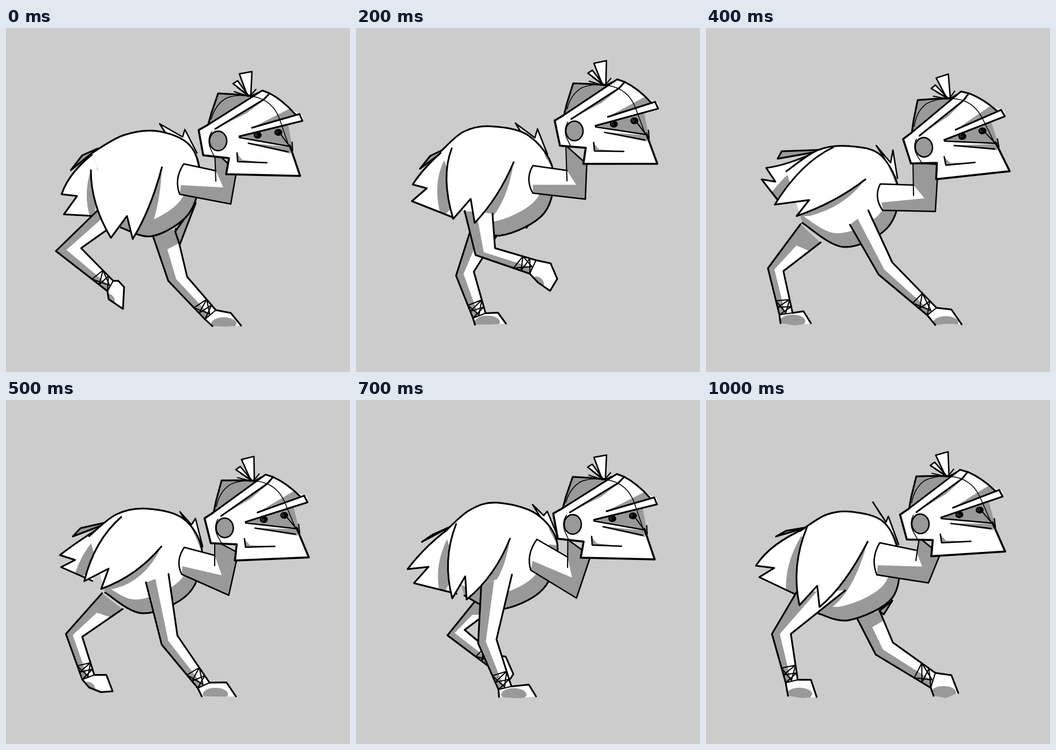
Animation of 600 by 600 pixels, one loop 1100 ms. Source, as an HTML page with a canvas:

```html
<!DOCTYPE html>
<html lang="en">
<head>
<meta charset="utf-8">
<title>Run cycle</title>
<style>
html, body { margin: 0; width: 100%; height: 100%; overflow: hidden; background: #ccc }
canvas { display: block }
</style>
</head>
<body>
<canvas id="stage" width="600" height="600"></canvas>
<script>
const g = document.getElementById("stage").getContext("2d");
const WHITE = "#fff", GRAY = "#999", INK = "#000", STEP = 100, STEPS = 11;

// Each part has one row of x y pairs per key pose; steps between keys are blended.
const KEYS = [0, 1, 3, 4, 6, 8, 10];
const part = (...rows) => rows.map(r => r.split(" ").map(Number));

// ear x, ear y, head tilt in degrees, unused
const head = part("370 197 0 0", "381 176 0 0", "381 183 -3 0", "380 208 -7.5 0",
  "383 238 0 0", "373 196 0 0", "374 216 -5 0");

const body = part(
  "150 218 205 187 265 180 320 204 338 258 318 325 255 363 200 348",
  "146 205 185 172 235 162 305 178 346 235 332 310 262 357 210 347",
  "150 225 190 190 235 181 295 196 340 255 325 335 240 367 178 330",
  "140 250 195 213 250 206 305 222 336 285 315 350 240 382 168 340",
  "150 225 190 186 240 173 315 193 348 245 322 325 238 362 178 332",
  "160 235 205 199 250 185 315 205 355 262 330 335 260 369 200 350",
  "165 228 210 200 255 195 310 213 336 270 325 345 250 384 195 372");

// start, control, tip, notch, tip, control, end
const wing = part(
  "148 248 148 308 183 366 211 328 221 368 252 318 272 243",
  "144 228 142 290 186 348 208 303 226 348 255 308 273 232",
  "190 192 153 230 153 318 192 293 188 332 242 285 277 236",
  "222 208 165 235 120 308 180 300 158 328 225 305 278 264",
  "180 200 143 255 153 324 178 288 174 331 230 310 264 247",
  "169 233 157 305 183 368 203 327 212 365 255 305 273 237",
  "176 222 148 290 163 358 194 324 198 361 242 325 282 247");

// start, control, tip, notch, tip, end
const tail = part(
  "160 213 110 250 97 290 124 293 101 325 155 328",
  "150 203 112 245 95 292 130 287 99 318 163 328",
  "165 215 120 245 103 254 117 272 96 286 176 333",
  "195 215 140 240 105 244 121 268 97 264 125 300",
  "178 202 120 245 83 297 120 290 95 319 176 331",
  "168 230 125 258 97 293 133 292 107 320 175 345",
  "175 223 112 250 87 289 119 293 93 309 156 339");

const sliver = part("113 248 133 222 160 210", "105 256 125 228 150 205",
  "118 235 134 218 180 207", "125 228 132 215 215 212", "108 248 128 232 165 208",
  "122 247 140 237 168 232", "122 238 140 228 176 222");

const fluff = part("268 167 308 190 312 177 333 218", "268 156 310 178 313 166 330 198",
  "288 176 314 205 320 186 338 243", "297 205 322 235 326 213 334 262",
  "310 185 325 200 335 200 352 250", "306 180 330 203 332 188 352 225",
  "291 178 314 213 318 203 336 252");

const farWing = part("331 305 303 378 295 355", "335 300 305 367 292 352",
  "310 320 290 330 280 330", "310 320 290 330 280 330", "310 315 290 325 280 325",
  "340 325 285 383 265 374", "325 350 310 374 302 368");

// shoulder top, inner elbow, throat, nape, outer elbow, shoulder bottom
const neck = part(
  "310 237 366 249 364 215 402 250 392 307 303 290",
  "305 240 371 251 368 205 403 235 403 296 312 292",
  "312 240 365 246 364 205 402 240 397 301 305 284",
  "304 272 362 274 361 235 405 238 400 320 308 318",
  "318 242 366 268 367 255 405 295 377 361 305 290",
  "313 244 372 280 372 232 413 250 392 330 305 304",
  "303 249 366 262 372 240 408 270 388 319 298 305");

// rear hip, knee, ankle, four foot points, front ankle, knee, hip
const nearLeg = part(
  "160 318 87 389 177 459 179 473 204 490 206 452 196 441 187 441 131 384 186 345",
  "164 320 146 390 250 427 272 443 294 456 309 438 296 411 264 406 190 381 215 340",
  "215 318 271 402 356 430 362 444 383 461 393 437 383 410 364 404 295 387 261 307",
  "251 343 301 430 386 501 400 518 420 516 446 517 428 491 402 488 325 409 283 318",
  "237 293 242 423 283 504 283 516 320 519 356 517 341 494 308 498 273 413 284 289",
  "200 350 184 426 214 506 216 520 245 522 272 517 262 499 234 501 217 422 260 320",
  "158 335 115 408 139 493 143 516 168 520 193 518 183 488 160 488 148 408 243 332");
const farLeg = part(
  "256 362 283 441 347 508 360 520 385 521 410 519 392 497 366 492 316 434 296 350",
  "238 350 216 425 240 515 244 520 270 517 296 515 283 500 262 503 248 412 290 352",
  "172 322 133 439 168 497 171 515 200 518 227 516 212 493 190 492 163 438 212 355",
  "165 342 108 419 128 500 130 515 155 519 183 515 170 494 151 497 135 424 200 374",
  "170 332 101 397 138 475 160 488 176 500 189 501 180 465 157 462 131 402 207 355",
  "245 370 218 424 322 452 335 465 362 473 360 455 342 430 327 428 248 400 272 372",
  "262 378 296 444 392 502 397 516 418 520 440 511 428 480 400 476 326 423 303 368");

const mix = (a, b, t) => [a[0] + (b[0] - a[0]) * t, a[1] + (b[1] - a[1]) * t];
const shift = (p, x, y) => [p[0] + x, p[1] + y];

function pose(rows, step) {
  const i = KEYS.findLastIndex(k => k <= step), j = Math.min(i + 1, KEYS.length - 1);
  const t = i === j ? 0 : (step - KEYS[i]) / (KEYS[j] - KEYS[i]);
  const points = [];
  for (let n = 0; n < rows[i].length; n += 2)
    points.push(mix(rows[i].slice(n, n + 2), rows[j].slice(n, n + 2), t));
  return points;
}

function poly(points, close) {
  const path = new Path2D();
  points.forEach(p => path.lineTo(...p));
  if (close) path.closePath();
  return path;
}

function smooth(points) {
  const path = new Path2D(), at = i => points[Math.max(0, Math.min(points.length - 1, i))];
  path.moveTo(...at(0));
  for (let i = 0; i < points.length - 1; i++) {
    const [a, b, c, d] = [at(i - 1), at(i), at(i + 1), at(i + 2)];
    path.bezierCurveTo(b[0] + (c[0] - a[0]) / 6, b[1] + (c[1] - a[1]) / 6,
      c[0] - (d[0] - b[0]) / 6, c[1] - (d[1] - b[1]) / 6, ...c);
  }
  return path;
}

function fill(path, color = WHITE) {
  g.fillStyle = color;
  g.fill(path);
}

function ink(path, width = 3) {
  g.lineWidth = width;
  g.strokeStyle = INK;
  g.stroke(path);
}

function within(path, draw) {
  g.save();
  g.clip(path);
  draw();
  g.restore();
}

function drawLeg(p, shaded) {
  const [h1, k1, a1, f1, f2, f3, f4, a2, k2, h2] = p;
  const planted = f2[1] > 510, outline = poly(p);
  fill(outline);
  within(outline, () => {
    fill(poly([h1, k1, a1, mix(a1, a2, .45), mix(k1, k2, .42), mix(h1, h2, .42)]), GRAY);
    if (shaded) fill(poly([h1, h2, mix(h2, k2, .3), mix(h1, k1, .4)]), GRAY);
    const sole = new Path2D(), mid = mix(f1, f3, .4);
    if (planted) sole.ellipse(mid[0], mid[1] - 4, 22, 11, 0, 0, 7);
    else sole.ellipse(f1[0], f1[1], 12, 9, .7, 0, 7);
    fill(sole, GRAY);
  });
  if (planted) {
    ink(poly([h1, k1, a1, f1]));
    ink(poly([f3, f4, a2, k2, h2]));
  } else ink(outline);
  const rear = t => mix(k1, a1, t), front = t => mix(k2, a2, t);
  ink(poly([rear(.7), front(.68), rear(.84), front(.85), rear(1), front(1)]), 2);
  ink(poly([front(.68), mix(rear(.98), front(.98), .5), rear(.7)]), 2);
}

function wingPath([s, c1, t1, n, t2, c2, e]) {
  const path = new Path2D();
  path.moveTo(...s);
  path.quadraticCurveTo(...c1, ...t1);
  path.lineTo(...n);
  path.lineTo(...t2);
  path.quadraticCurveTo(...c2, ...e);
  return path;
}

function drawTail([s, c, ...tips], w) {
  const path = new Path2D();
  path.moveTo(...s);
  path.quadraticCurveTo(...c, ...tips[0]);
  tips.slice(1).forEach(p => path.lineTo(...p));
  fill(path);
  within(path, () => fill(wingPath(w.map((p, i) => shift(p, i ? -20 : 0, 0))), GRAY));
  ink(path);
}

function drawBody(points, w) {
  const path = smooth(points);
  fill(path, GRAY);
  within(path, () => {
    g.save();
    g.translate(-14, -24);
    fill(path);
    g.restore();
    fill(smooth(points.slice(0, 5)));
    const [t2, c, e] = w.slice(4), shade = new Path2D();
    shade.moveTo(...e);
    shade.quadraticCurveTo(...c, ...t2);
    shade.lineTo(t2[0] + 22, t2[1]);
    shade.quadraticCurveTo(c[0] + 16, c[1] + 8, ...e);
    fill(shade, GRAY);
  });
  ink(path);
}

function drawNeck([a, b, c, d, e, f]) {
  const path = new Path2D(), left = mix(a, f, .5);
  path.moveTo(...c);
  for (const p of [d, e, f]) path.lineTo(...p);
  path.quadraticCurveTo(left[0] - 14, left[1], ...a);
  path.lineTo(...b);
  fill(path);
  within(path, () => fill(poly([c, d, e, f, mix(f, a, .3), mix(e, b, .5), b]), GRAY));
  ink(path, 2.5);
  ink(poly([c, shift(b, 0, 18)]), 2);
}

const svg = d => new Path2D(d);
function drawHead([[x, y], [tilt]]) {
  g.save();
  g.translate(x, y);
  g.rotate(tilt * Math.PI / 180);
  g.translate(-381, -176);

  const skull = svg("M363 150L369 128 381 93 415 95 440 98 440 112Z");
  fill(skull, GRAY);
  ink(svg("M363 150L369 128 381 93 415 95 440 98"));
  ink(svg("M369 138Q376 112 396 101 415 94 438 98"), 1.5);

  for (const d of ["M418 59L440 55 438 96 432 97Z", "M407 76L415 71 434 97Z"]) {
    fill(svg(d));
    ink(svg(d), 2.5);
  }
  ink(svg("M409 90L434 98M415 83L434 98M447 86L436 98M450 92L437 98"), 2);

  fill(svg("M347 157L458 88 471 93 508 122 528 131 529 141 418 168 508 186 524 237 395 234 400 206 355 201Z"));
  fill(svg("M418 168L503 146 510 186 470 179Z"), GRAY);
  fill(svg("M376 155L460 104 469 99 430 128Z"), GRAY);
  fill(svg("M440 153L505 120 519 130Z"), GRAY);
  fill(svg("M428 179L509 187 507 198Z"), GRAY);
  fill(svg("M414 198L423 209 466 214 415 213Z"), GRAY);
  fill(svg("M505 177L512 179 510 192 506 191Z"), GRAY);

  ink(svg("M440 98Q477 104 489 140L504 184"), 1.5);
  ink(svg("M363 148L458 88 471 93 460 104 376 155"));
  ink(svg("M471 93Q494 105 516 130M440 153L523 129 528 141 418 168"));
  ink(svg("M418 170L508 186M434 180L503 195"), 2.5);
  ink(svg("M414 197L415 212 466 214"), 2.5);
  ink(svg("M363 148L347 157 355 201 400 206 395 234 524 237 506 184"), 3.5);
  ink(svg("M490 164L511 193 510 178"), 2);

  for (const [ex, ey] of [[450, 166], [486, 161]]) {
    const eye = new Path2D(), glint = new Path2D();
    eye.ellipse(ex, ey, 7, 6, 0, 0, 7);
    glint.arc(ex - 2, ey - 1, 2, 0, 5);
    fill(eye, INK);
    g.strokeStyle = "#555";
    g.lineWidth = 1;
    g.stroke(glint);
  }
  const ear = new Path2D();
  ear.ellipse(381, 176, 15, 17, 0, 0, 7);
  fill(ear, GRAY);
  ink(ear, 2.5);
  ink(svg("M370 160Q361 174 368 190L375 205"), 1.5);
  g.restore();
}

function drawBird(step) {
  const at = rows => pose(rows, step);
  g.fillStyle = "#ccc";
  g.fillRect(0, 0, 600, 600);
  g.lineCap = g.lineJoin = "round";

  const w = at(wing), plume = at(fluff);
  drawLeg(at(farLeg), true);
  for (const rows of [farWing, sliver]) {
    const path = poly(at(rows), true);
    fill(path, GRAY);
    ink(path);
  }
  const spikes = poly([shift(plume[0], 14, 22), ...plume]);
  fill(spikes);
  ink(spikes, 2.5);
  drawTail(at(tail), w);
  drawBody(at(body), w);
  drawLeg(at(nearLeg), false);
  const cloak = wingPath(w);
  fill(cloak);
  ink(cloak);
  drawNeck(at(neck));
  drawHead(at(head));
}

const start = performance.now();
function frame() {
  drawBird(Math.floor((performance.now() - start) / STEP) % STEPS);
  requestAnimationFrame(frame);
}
frame();
</script>
</body>
</html>
```
